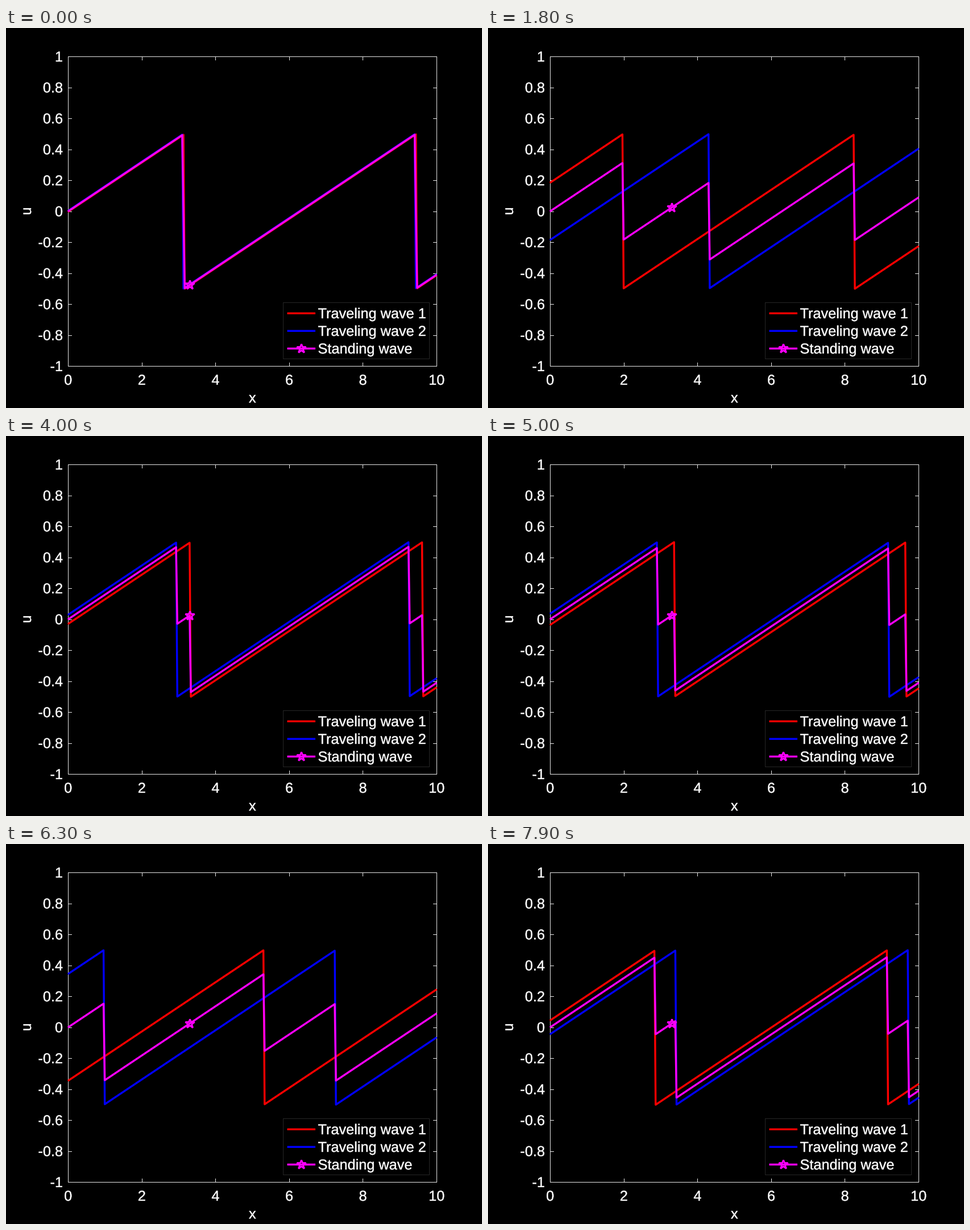
Recreate the animation shown at these times as a matplotlib script. Size 837x669 px, loop 8 s.

```python
import numpy as np
import matplotlib.pyplot as plt
from matplotlib.animation import FuncAnimation
from matplotlib.markers import MarkerStyle
from matplotlib.patheffects import Stroke

W, H, DPI = 837, 669, 64
PT = 72 / DPI  # points per pixel
LEFT, RIGHT, TOP, BOTTOM = 109.5, 757.5, 50.5, 595.5
ORIGIN = 108.8  # curves start slightly left of the pixel-aligned frame
FRAMES, INTERVAL = 80, 100
SPEED, START = 0.6325, 0.019  # phase step per frame, first phase
RED, BLUE, MAGENTA = "#ff0000", "#0000ff", "#ff00ff"
AXIS = "#e6e6e6"
TICK = 6.5
FONT = 25.3

plt.rcParams["font.family"] = "Liberation Sans"
plt.rcParams["text.hinting"] = "none"

fig = plt.figure(figsize=(W / DPI, H / DPI), dpi=DPI, facecolor="black")
ax = fig.add_axes([0, 0, 1, 1])
ax.set_xlim(0, W)
ax.set_ylim(H, 0)
ax.axis("off")


def px(x):
    return ORIGIN + x * (RIGHT - ORIGIN) / 10


def py(u):
    return (TOP + BOTTOM) / 2 - u * (BOTTOM - TOP) / 2


def crisp(v):
    return np.floor(v) + 0.5


def line(xs, ys, color=AXIS, width=1.0, z=2):
    return ax.plot(xs, ys, color=color, lw=width * PT, zorder=z,
                   solid_capstyle="butt", solid_joinstyle="round",
                   clip_on=False, snap=False)[0]


def label(x, y, text, ha="center", rotation=0):
    ax.text(x, y, text, color="white", size=FONT * PT, ha=ha, va="baseline",
            rotation=rotation, rotation_mode="anchor",
            path_effects=[Stroke(linewidth=0.4 * PT, foreground="white")])


def star(x, y):
    marker = MarkerStyle("*", fillstyle="none", joinstyle="bevel")
    return ax.plot([x], [y], marker=marker, ms=17 * PT, mew=2.9 * PT,
                   color=MAGENTA, ls="none", zorder=6, snap=False)[0]


def box(x0, y0, x1, y1, color):
    line([x0, x1, x1, x0, x0], [y0, y0, y1, y1, y0], color)


def draw_axes():
    box(LEFT, TOP, RIGHT, BOTTOM, AXIS)
    for v in range(0, 11, 2):
        x = LEFT + v * (RIGHT - LEFT) / 10
        tick = crisp(x)
        line([tick, tick], [TOP, TOP + TICK])
        line([tick, tick], [BOTTOM, BOTTOM - TICK])
        label(x - 0.3, 628, str(v))
    for k in range(-5, 6):
        y = py(k / 5)
        tick = crisp(y)
        line([LEFT, LEFT + TICK], [tick, tick])
        line([RIGHT, RIGHT - TICK], [tick, tick])
        label(100, y + 8.5, f"{k / 5:g}", ha="right")
    label(433.3, 659.4, "x")
    label(44, 322.5, "u", rotation=90)


def draw_legend():
    box(487.5, 483.5, 744.5, 582.5, "#262626")
    rows = [("Traveling wave 1", RED), ("Traveling wave 2", BLUE),
            ("Standing wave", MAGENTA)]
    for i, (name, color) in enumerate(rows):
        y = 502.3 + 31 * i
        line([494.5, 544], [y, y], color, 3.4)
        label(548.5, y + 8.7, name, ha="left")
    star(518.7, 564.3)


def saw(x):
    """Sawtooth of period 2 pi between -0.5 and 0.5, zero at the origin."""
    return (x / (2 * np.pi) + 0.5) % 1 - 0.5


draw_axes()
draw_legend()

x = np.linspace(0, 10, 301)
PROBE = 99
waves = [line(px(x), py(0 * x), c, 3.4, z)
         for z, c in enumerate((RED, BLUE, MAGENTA), 3)]
probe = star(px(x[PROBE]), py(0))


def update(n):
    shift = START + SPEED * n
    right, left = saw(x - shift), saw(x + shift)
    mean = (right + left) / 2
    for wave, u in zip(waves, (right, left, mean)):
        wave.set_ydata(py(u))
    probe.set_ydata([py(mean[PROBE])])
    return [*waves, probe]


anim = FuncAnimation(fig, update, frames=FRAMES, interval=INTERVAL,
                     repeat=True, repeat_delay=0, blit=False)
plt.show()
```
